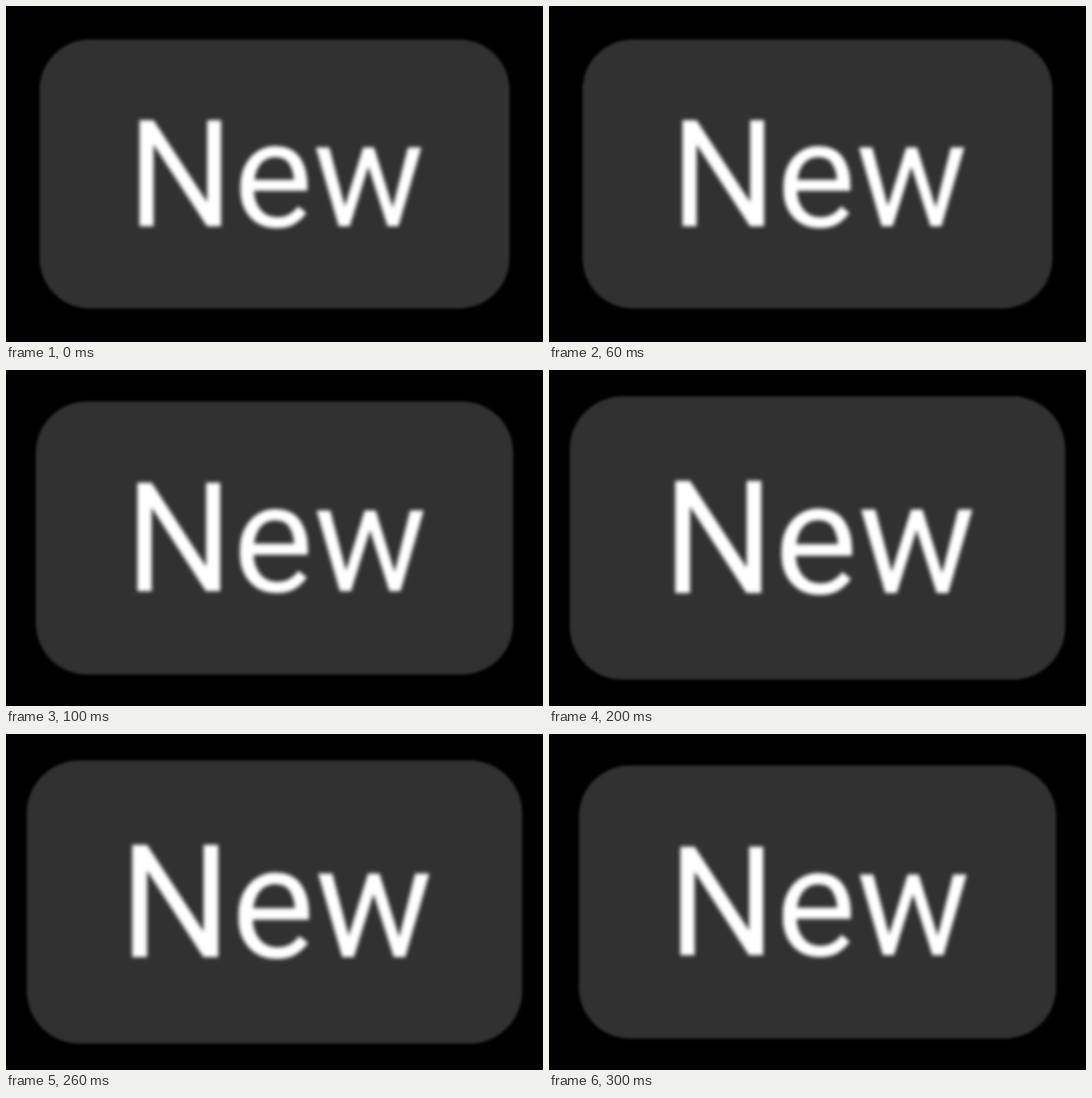
Recreate the animation shown at these times as an HTML page with a canvas. Size 576x360 px, loop 0.4 s.

```html
<!DOCTYPE html>
<html lang="en">
<head>
<meta charset="utf-8">
<title>New badge</title>
<style>
  html, body { margin: 0; width: 100%; height: 100%; overflow: hidden; background: #000; }
  canvas { display: block; }
</style>
</head>
<body>
<canvas id="stage" width="576" height="360"></canvas>
<script>
const ctx = document.getElementById('stage').getContext('2d');
const STEP = 100, STEPS = 4, GROWTH = 0.0545;

// The badge swells in held steps, slowly at first, and shrinks the same way.
function scaleAt(ms) {
  const phase = Math.floor(ms / STEP) % STEPS / STEPS;
  const rise = 1 - Math.abs(1 - 2 * phase);
  return 1 + GROWTH * rise ** 1.8;
}

function draw(ms) {
  const scale = scaleAt(ms);
  ctx.setTransform(1, 0, 0, 1, 0, 0);
  ctx.filter = 'none';
  ctx.fillStyle = '#000';
  ctx.fillRect(0, 0, 576, 360);

  ctx.translate(288, 180);
  ctx.scale(scale, scale);

  ctx.filter = 'blur(1.5px)';
  ctx.fillStyle = '#313131';
  ctx.beginPath();
  ctx.roundRect(-252, -144, 504, 288, 54);
  ctx.fill();

  ctx.filter = 'blur(2px)';
  ctx.fillStyle = '#fff';
  ctx.font = '400 160px Roboto, sans-serif';
  ctx.fillText('New', -158, 56);
}

function tick(now) {
  draw(now);
  requestAnimationFrame(tick);
}
requestAnimationFrame(tick);
</script>
</body>
</html>
```
